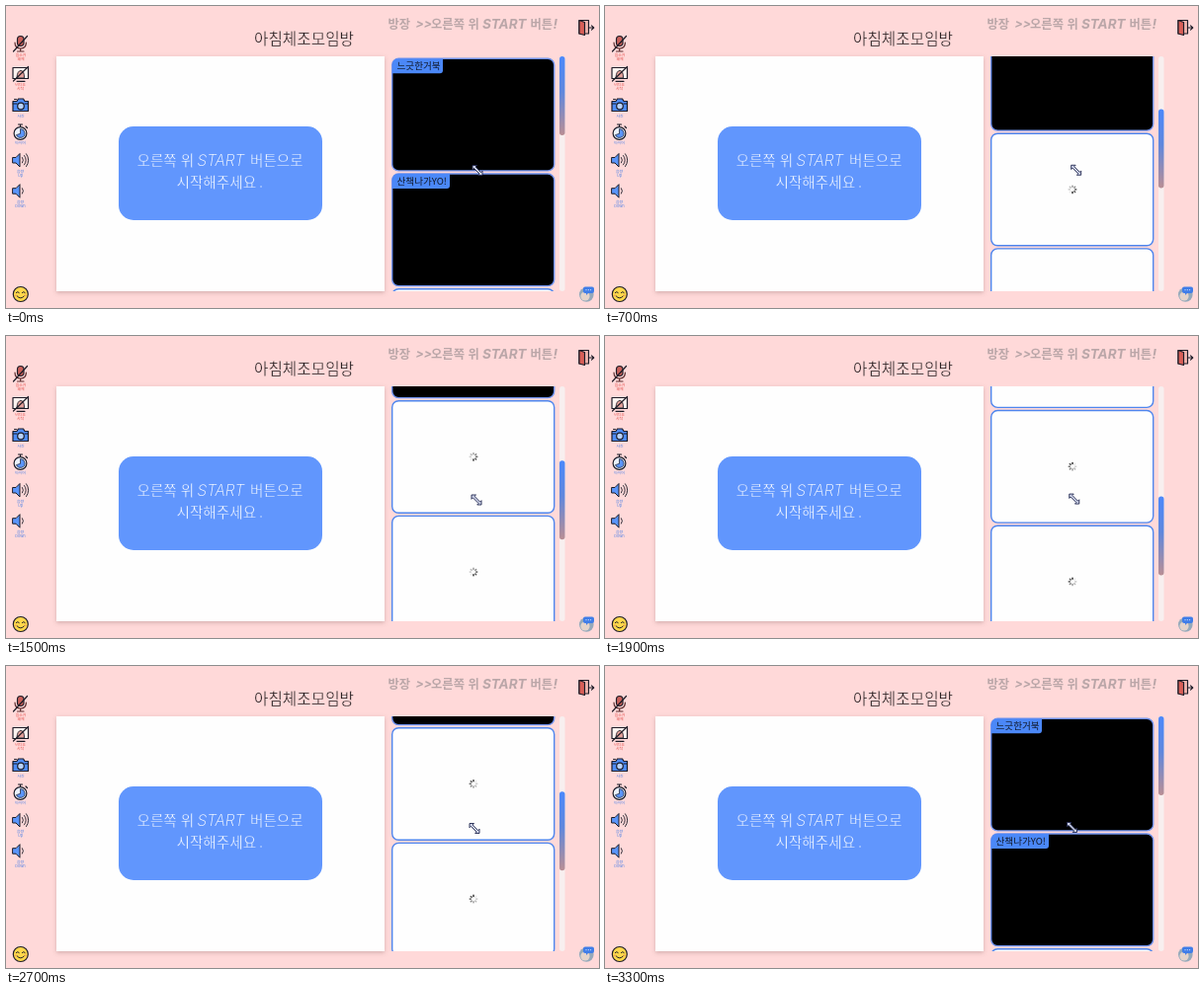
An HTML page that plays this animation: 600 px wide and 306 px high, repeating every 3500 ms.

```html
<!DOCTYPE html>
<html lang="ko">
<head>
<meta charset="utf-8">
<title>화상 운동방</title>
<style>
  html, body { margin: 0; width: 100%; height: 100%; overflow: hidden; background: #ffd9d9; }
  svg { display: block; width: 600px; height: 306px; font-family: "Noto Sans CJK KR", "Noto Sans CJK", "Noto Sans", sans-serif; }
  .latin { font-family: Inter, "Noto Sans", sans-serif; font-style: italic; }
  /* a stroke in the background colour thins the letters */
  .title { font-size: 15.7px; font-weight: 300; fill: #1c1618; stroke: #ffd9d9; stroke-width: .35; }
  .notice { font-size: 14.6px; font-weight: 300; fill: #fff; stroke: #6196fd; stroke-width: .35; }
  .notice .latin { font-size: 15.6px; font-weight: 200; stroke: none; }
  .head { font-size: 12.3px; font-weight: 700; fill: #baa6a8; }
  .tiny { font-size: 3.9px; text-anchor: middle; opacity: .9; }
  .name { font-size: 9.6px; fill: #101828; }
  .icon { stroke: #1d1d28; stroke-width: 1.2; stroke-linejoin: round; stroke-linecap: round; fill: none; }
</style>
</head>
<body>
<svg viewBox="0 0 600 306">
  <defs>
    <clipPath id="listClip"><rect x="388" y="51" width="170" height="238"/></clipPath>
    <linearGradient id="thumbFill" x1="0" y1="0" x2="0" y2="1">
      <stop offset="0" stop-color="#4b88fb"/>
      <stop offset=".45" stop-color="#5f87dd"/>
      <stop offset="1" stop-color="#b98e94"/>
    </linearGradient>
    <filter id="shade" x="-5%" y="-5%" width="110%" height="112%">
      <feDropShadow dx="0" dy="1.5" stdDeviation="2" flood-color="#704848" flood-opacity=".3"/>
    </filter>
  </defs>
  <rect width="600" height="306" fill="#ffd9d9"/>

  <text class="title" x="251" y="38.5">아침체조모임방</text>
  <g class="head">
    <text x="386.5" y="22.5">방장</text>
    <text class="latin" x="414.5" y="22">&gt;&gt;</text>
    <text x="430" y="22.5">오른쪽 위</text>
    <text class="latin" x="482" y="22.5" font-size="13.5">START</text>
    <text x="530.5" y="22.5">버튼</text>
    <text class="latin" x="553.5" y="22.5" font-size="13.5">!</text>
  </g>

  <rect x="51" y="51" width="332" height="238" fill="#fefefe" filter="url(#shade)"/>
  <rect x="114" y="122" width="206" height="95" rx="15" fill="#6196fd"/>
  <g class="notice">
    <text x="132.5" y="162">오른쪽 위</text>
    <text class="latin" x="193.5" y="162">START</text>
    <text x="247" y="162">버튼으로</text>
    <text x="172.5" y="183.5">시작해주세요</text>
    <text x="256" y="183.5">.</text>
  </g>

  <!-- side tools -->
  <g class="icon">
    <rect x="11.5" y="30.5" width="6.5" height="10" rx="3.2" fill="#c9605a"/>
    <path d="M9 37q0 6 5.700 6t5.700-6M14.700 43v3M11.500 46h6.500" stroke="#5c2c2e"/>
    <path d="M21.500 30.500L7.500 46"/>
    <rect x="7" y="62.500" width="15.500" height="11" fill="#fff3f0"/>
    <path d="M11 72.500q.5-7 4-7t3.500 7z" fill="#e9a39c" stroke-width=".9"/>
    <path d="M11 76.300h8M22.500 61.500L7.500 76"/>
    <path d="M7 96.500h4l1.500-2.500h5l1.500 2.500h3.500v10H7z" fill="#4e8bf6"/>
    <circle cx="15" cy="101.500" r="3.300" fill="#b9d2ff"/>
    <path d="M8.500 94.500h2M7 99h4M19 99h3.500" stroke-width="1"/>
    <circle cx="14.500" cy="129" r="6.400" fill="#eaf2ff"/>
    <path d="M14.500 129V124.500a4.500 4.500 0 1 1-4 6.500z" fill="#5b95fa" stroke-width=".7"/>
    <path d="M12.500 120h4M14.500 120v2.300M20 122l1.500 1.500"/>
    <path id="speaker" d="M7 153.500h3l4-4v13.500l-4-4H7z" fill="#5b95fa" stroke-width="1"/>
    <path d="M16.500 153.500q2 2.700 0 5.400M18.500 151.500q3.500 4.700 0 9.400M20.500 149.800q4.500 6.400 0 12.800" stroke-width=".9"/>
    <use href="#speaker" y="31.200"/>
    <path d="M16.500 184.700q2 2.700 0 5.400" stroke-width=".9"/>
  </g>
  <g id="toolText"></g>

  <!-- corners -->
  <g class="icon">
    <circle cx="14.800" cy="292" r="7.500" fill="#ffd84a"/>
    <path d="M10.300 290.500q1.500-2 3 0M16.300 290.500q1.500-2 3 0M11.300 294q3.500 4 7 0" stroke-width="1"/>
    <path d="M10 293.300h.1M19.500 293.300h.1" stroke="#f5985a" stroke-width="1.800"/>
    <path d="M580 14.500h9.500v13.500H580z" fill="#f4b5ae"/>
    <path d="M580 14.500l5.500 2v13l-5.500-1.500z" fill="#d85f58"/>
    <path d="M589.500 22h5M592.500 19.800l2.300 2.200-2.300 2.200" stroke-width="1.100"/>
  </g>
  <circle cx="587.300" cy="292.500" r="7.300" fill="#94a9bb"/>
  <circle cx="586" cy="294" r="4.600" fill="#e3d3ca"/>
  <path d="M586 284.500h7q2 0 2 2v2.500q0 2-2 2h-4l-2 2v-2h-1q-2 0-2-2v-2.500q0-2 2-2z" fill="#3f7de8"/>
  <path d="M586.500 287.700h6" stroke="#dbe8ff" stroke-width="1" stroke-dasharray="1 1.300"/>

  <g clip-path="url(#listClip)"><g id="list"></g></g>
  <rect x="560" y="51" width="5.500" height="238" rx="2.700" fill="#f8efef"/>
  <rect id="thumb" x="560" y="51" width="5.500" height="80" rx="2.700" fill="url(#thumbFill)"/>
  <path id="cursor" d="M-5-5h4.500l-1.400 1.400L3.600 2.100 5 .7V5H.7l1.400-1.400-5.700-5.700L-5-.7z"
        fill="#cfd4ea" stroke="#20264f" stroke-width=".9"/>
</svg>
<script>
const LOOP = 3500, STEP = 100, LAST = 3300;
const PITCH = 116.7, TOP = 52.6, THUMB_RATIO = 0.34;
const $ = id => document.getElementById(id);

// [time, scroll offset]
const scrollKeys = [[0, 0], [380, 255], [700, 157.5], [1200, 2], [1500, 221],
                    [1850, 330], [2200, 287.4], [2700, 224], [3300, 0]];
// [time, x], [time, y]
const cursorX = [[0, 477], [1200, 476.5], [1500, 476], [2200, 474], [2700, 474], [3300, 472.5]];
const cursorY = [[0, 166.5], [1500, 166], [2200, 164.5], [2700, 164.5], [3300, 163.5]];

const toolLabels = [
  [15, 50.5, '음소거', 'red'], [15, 54.5, '해제', 'red'],
  [14.5, 80.5, '비디오', 'red'], [14.5, 85, '시작', 'red'],
  [15, 112.5, '사진'], [14.5, 139.5, '타이머'],
  [14.5, 169, '음량'], [14.5, 173, 'Up'],
  [14.5, 199.5, '음량'], [14.5, 204, 'Down']
];
$('toolText').innerHTML = toolLabels.map(([x, y, s, c]) =>
  `<text class="tiny" x="${x}" y="${y}" fill="${c ? '#e0433f' : '#3d78e6'}">${s}</text>`).join('');

function spinner(y) {
  let spokes = '';
  for (let i = 0; i < 8; i++)
    spokes += `<path d="M0-2.700V-3.700" transform="rotate(${i * 45})" stroke-opacity="${0.1 + i * 0.12}"/>`;
  return `<g transform="translate(473 ${y})"><g class="spin" stroke="#333" stroke-width="1.600" stroke-linecap="round">${spokes}</g></g>`;
}

function card(i) {
  const y = TOP + i * PITCH, people = [['느긋한거북', 51], ['산책나가YO!', 58]][i];
  const frame = `<rect x="390.700" y="${y + 0.7}" width="164" height="113.600" rx="6.500"
    fill="${people ? '#000' : '#fefefe'}" stroke="${people ? '#6f92ee' : '#4f86ee'}" stroke-width="1.400"/>`;
  if (!people) return frame + spinner(y + 57.4);
  const [name, w] = people;
  return frame + `<path d="M391 ${y + 15.6}v-8.800q0-6 6-6h${w - 6}v11.800q0 3-3 3z" fill="#4b88f8"/>
    <text class="name" x="395.500" y="${y + 11.6}">${name}</text>`;
}
$('list').innerHTML = [0, 1, 2, 3, 4, 5].map(card).join('');
const spinners = document.querySelectorAll('.spin');

function sample(keys, t) {
  let i = 1;
  while (i < keys.length - 1 && keys[i][0] < t) i++;
  const [t0, a] = keys[i - 1], [t1, b] = keys[i];
  const p = Math.min(1, (t - t0) / (t1 - t0));
  return a + (b - a) * (1 - Math.cos(Math.PI * p)) / 2;
}

function draw(now) {
  const t = Math.min(LAST, Math.floor((now % LOOP) / STEP) * STEP);
  const s = sample(scrollKeys, t);
  $('list').setAttribute('transform', `translate(0 ${-s})`);
  $('thumb').setAttribute('y', 51 + s * THUMB_RATIO);
  $('cursor').setAttribute('transform', `translate(${sample(cursorX, t)} ${sample(cursorY, t)})`);
  spinners.forEach(el => el.setAttribute('transform', `rotate(${t / STEP * 135})`));
}

const start = performance.now();
function tick() {
  draw(performance.now() - start);
  requestAnimationFrame(tick);
}
tick();
</script>
</body>
</html>
```
